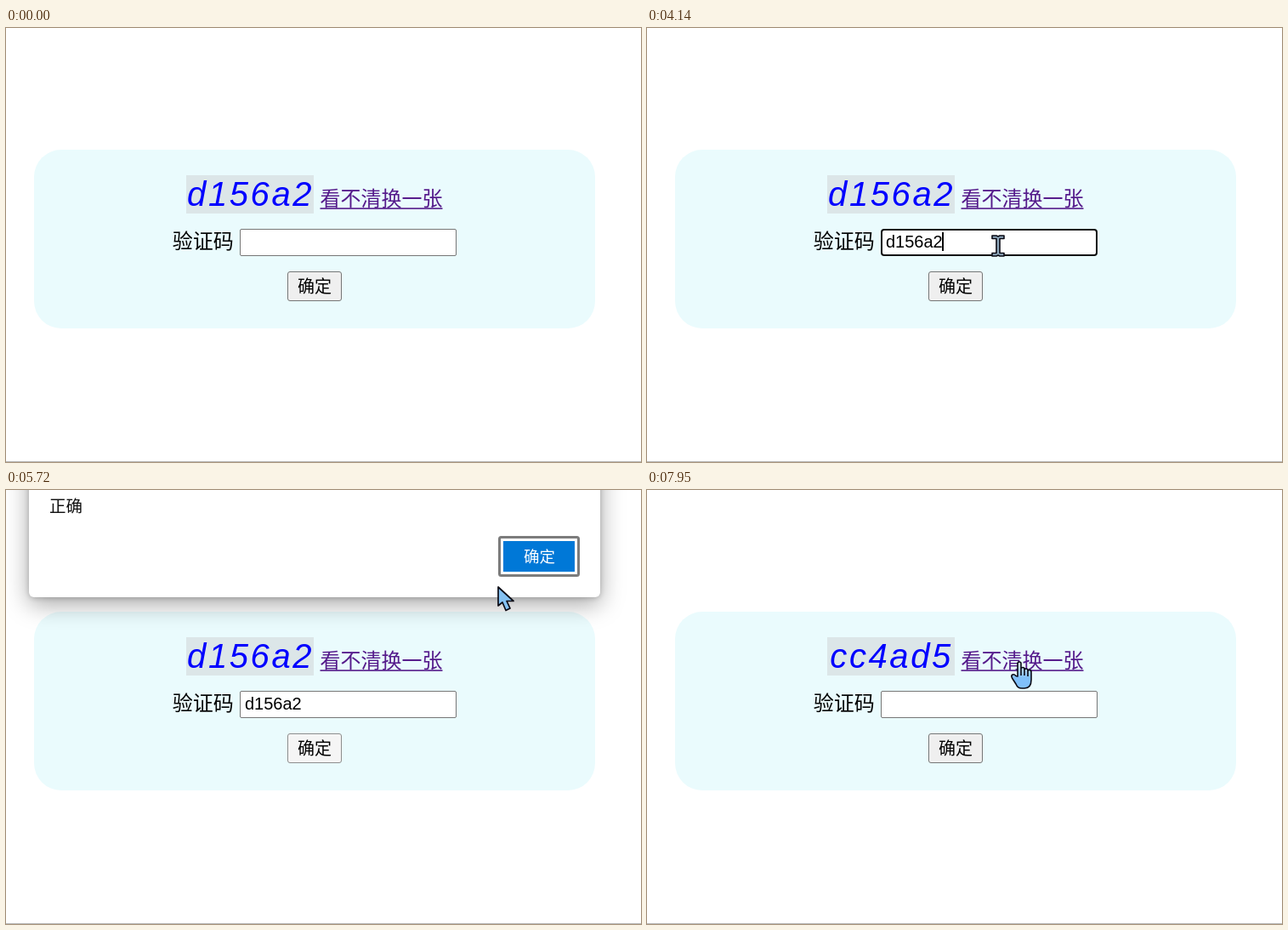
Animation of 747 by 510 pixels, one loop 8 s. Source, as an HTML page:

```html
<!DOCTYPE html>
<html lang="zh-CN">
<head>
<meta charset="utf-8">
<title>验证码</title>
<style>
  html, body { margin: 0; width: 100%; height: 100%; overflow: hidden; background: #fff; }
  svg { display: block; width: 747px; height: 510px; }
  text { font-family: "Noto Sans CJK SC", "Noto Sans CJK", sans-serif; white-space: pre; }
  #code, #value { font-family: "Liberation Sans", Arial, sans-serif; }
  #code { font-size: 40px; font-style: italic; letter-spacing: 2.6px; fill: #00f; text-anchor: middle; }
  #value { font-size: 20px; }
  #sheet { filter: drop-shadow(0 1px 3px rgba(0,0,0,.2)) drop-shadow(0 8px 14px rgba(0,0,0,.34)); }
  #cursor path { stroke: #0a0a14; stroke-linejoin: round; }
</style>
</head>
<body>
<svg viewBox="0 0 747 510">
  <defs>
    <linearGradient id="skin" x2="0" y2="1">
      <stop offset=".1" stop-color="#d3e4ee"/>
      <stop offset=".6" stop-color="#80c0fa"/>
    </linearGradient>
  </defs>
  <rect y="509" width="747" height="1" fill="#b9b9b9"/>
  <rect x="33" y="143" width="660" height="210" rx="32" fill="#eafbfd"/>
  <rect x="212" y="173" width="150" height="45" fill="#dce6e8"/>
  <text id="code" x="287.6" y="209"></text>

  <g id="link">
    <text x="369.5" y="208.5" font-size="24">看不清换一张</text>
    <rect x="369.5" y="211.3" width="144" height="1.6"/>
  </g>

  <text x="195.8" y="258.5" font-size="24">验证码</text>
  <rect id="field" fill="#fff"/>
  <text id="value" x="281" y="258"></text>
  <rect id="caret" width="2" height="22"/>

  <rect id="button" x="331.5" y="286.5" width="63" height="34" rx="2.5"/>
  <text x="343" y="311" font-size="20">确定</text>

  <g id="dialog">
    <rect id="sheet" x="27" y="-90" width="672" height="216" rx="6" fill="#fff"/>
    <text x="51" y="26" font-size="19.5" fill="#111">正确</text>
    <rect id="ring" x="580.5" y="55.5" width="93" height="45" rx="2" stroke-width="3"/>
    <rect id="ok" x="585" y="60" width="84" height="36"/>
    <text x="609" y="84.5" font-size="18.5" fill="#fff">确定</text>
  </g>

  <circle id="click" r="18" fill="rgba(255,240,0,.5)"/>
  <g id="cursor">
    <path id="arrow" d="M0 0V22L5 18L9 27.5L14 25L10 16.5H18Z" fill="#84c1f2" stroke-width="1.7"/>
    <path id="beam" d="M-7 -12H-2L0 -11L2 -12H7V-8.5H2V8.5H7V12H2L0 11L-2 12H-7V8.5H-2V-8.5H-7Z"
      fill="#8fa9bd" stroke-width="1.6"/>
    <path id="hand" d="M-4 18V3Q-4 1 -2 1Q0 1 0 3V11V9Q0 7.500 2 7.500Q4 7.500 4 9.500V13V10.500Q4 9 6 9Q8 9 8 11V14V12Q8 10.500 10 10.500Q12 10.500 12 13V22Q12 32 4 32H1Q-4 32 -6 27L-10.500 20Q-12 17 -10 16Q-8 15 -6 17.500ZM0 11V17M4 13V17M8 14V18"
      fill="url(#skin)" stroke-width="1.6"/>
  </g>
</svg>
<script>
const LOOP = 8000, TICK = 70;
const el = id => document.getElementById(id);
const set = (id, attrs) => {
  for (const name in attrs) el(id).setAttribute(name, attrs[name]);
};
const show = (id, on) => { el(id).style.display = on ? "" : "none"; };

// start time, number of ticks, end x, end y
const moves = [
  [200, 1, 541, 418], [270, 4, 408, 253],
  [4060, 1, 410, 254], [4130, 1, 413, 256], [4200, 7, 366, 314],
  [4820, 2, 366, 307], [5370, 4, 538, 136], [5650, 4, 592, 107],
  [6000, 5, 624, 84], [6480, 5, 442, 198], [6820, 1, 441, 201],
  [7950, 1, 440, 201]
];
const clicks = [[820, 950], [5020, 5160], [6340, 6480], [7350, 7490]];
const keys = [1680, 2080, 2810, 3000, 3600, 3950];
const caretOff = [[1350, 1680], [2610, 2810], [3530, 3600]];
const codes = [[0, "d156a2"], [6550, "6743c4"], [7490, "cc4ad5"]];
const slide = [-26, -3, 0];

const within = (t, spans) => spans.some(([a, b]) => t >= a && t < b);
const inside = ([x, y], l, top, r, b) => x >= l && x < r && y >= top && y < b;

function pointer(t) {
  let x = 541, y = 418;
  for (const [start, ticks, toX, toY] of moves) {
    if (t < start) break;
    const p = Math.min(1, (Math.floor((t - start) / TICK) + 1) / ticks);
    const eased = p * (2 - p);
    x += (toX - x) * eased;
    y += (toY - y) * eased;
  }
  return [Math.round(x), Math.round(y)];
}

function draw(t) {
  const at = pointer(t);
  const pressed = within(t, clicks);
  const open = t >= 5160 && t < 6480;
  const focus = t >= 820 && t < 5160;
  const overField = !open && t >= 200 && inside(at, 275, 236, 530, 268);
  const overLink = !open && inside(at, 369, 185, 514, 216);
  const overButton = !open && inside(at, 331, 286, 395, 321);

  const [, code] = codes.filter(([start]) => t >= start).pop();
  el("code").textContent = code;
  el("link").setAttribute("fill", overLink && pressed ? "#f00" : "#551a8b");

  const typed = t < 6550 ? keys.filter(k => t >= k).length : 0;
  el("value").textContent = "d156a2".slice(0, typed);
  const edge = focus ? 2 : 1;
  set("field", {
    x: 275 + edge / 2, y: 236 + edge / 2, width: 255 - edge, height: 32 - edge,
    rx: focus ? 3 : 1.5, "stroke-width": edge,
    stroke: focus ? "#101010" : overField ? "#4f4f4f" : "#767676"
  });
  show("caret", focus && !within(t, caretOff));
  set("caret", { x: Math.round(280.6 + 11.1 * typed), y: typed ? 240 : 241 });

  const [fill, stroke] = t >= 5020 && t < 6480 ? ["#f5f5f5", "#8d8d8d"]
    : overButton ? ["#e5e5e5", "#4f4f4f"] : ["#efefef", "#767676"];
  set("button", { fill, stroke });

  show("dialog", open);
  if (open) {
    const drop = slide[Math.min(2, Math.floor((t - 5160) / TICK))];
    const hover = inside(at, 579, 54, 675, 102);
    set("dialog", { transform: `translate(0 ${drop})` });
    set("ring", { fill: hover ? "#d8d8d8" : "#fff", stroke: hover ? "#626262" : "#7c7c7c" });
    set("ok", { fill: !hover ? "#0078d7" : pressed ? "#005ca3" : "#006cbe" });
  }

  const shape = overField ? "beam" : overLink ? "hand" : "arrow";
  for (const id of ["arrow", "beam", "hand"]) show(id, id === shape);
  show("cursor", t >= 200);
  set("cursor", { transform: `translate(${at})` });
  show("click", pressed);
  const [dx, dy] = shape === "arrow" ? [-1, -2] : [0, 0];
  set("click", { cx: at[0] + dx, cy: at[1] + dy });
}

const begin = performance.now();
function frame() {
  draw((performance.now() - begin) % LOOP);
  requestAnimationFrame(frame);
}
frame();
</script>
</body>
</html>
```
